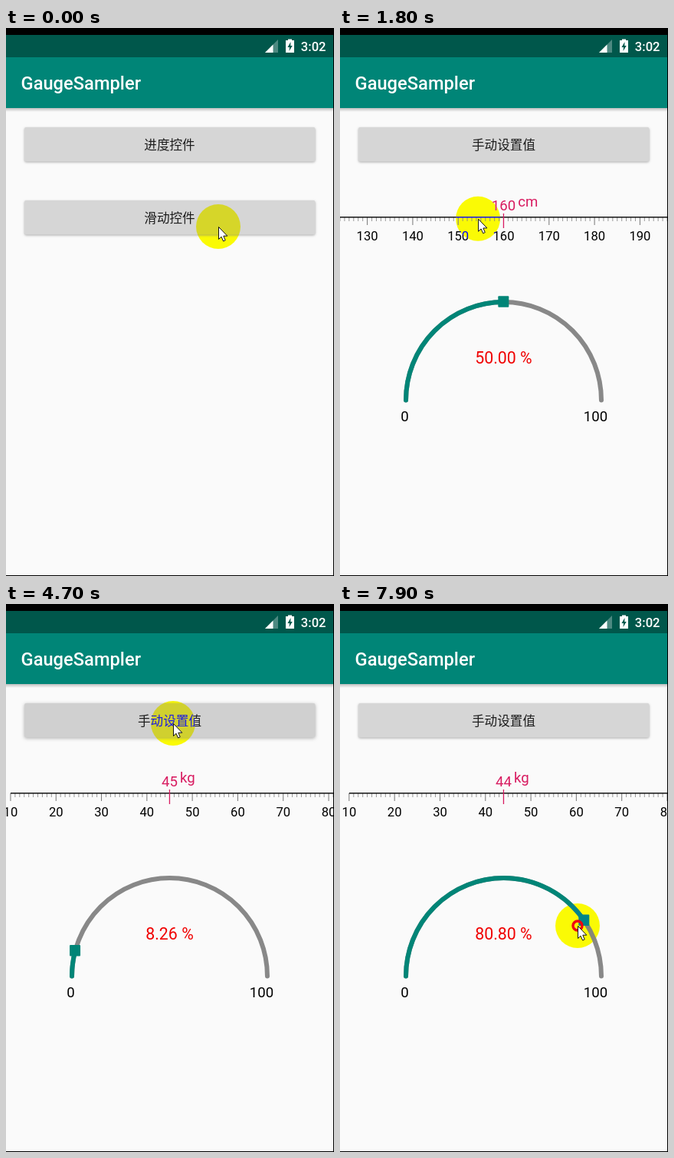
Recreate the animation shown at these times as an HTML page with a canvas. Size 428 by 712 pixels, loop 8 s.

```html
<!DOCTYPE html>
<html lang="zh">
<head>
<meta charset="utf-8">
<style>
html, body { margin: 0; width: 100%; height: 100%; overflow: hidden; background: #000; }
canvas { display: block; }
</style>
</head>
<body>
<canvas width="428" height="712"></canvas>
<script>
const ctx = document.querySelector('canvas').getContext('2d');
const LOOP = 8000, STEP = 100;
const MID = 213.5, UNIT = 5.93;
const ARC = { y: 483.5, r: 127.5 };
const TEAL = '#008577', PINK = '#d81b60';

// Rows are [time, values...]
const pointer = [
  [0, 277, 258], [500, 277, 258], [1100, 233, 217], [1900, 178, 249],
  [2500, 237, 249], [2800, 249, 251], [3400, 260, 317], [4200, 220, 158],
  [4700, 218, 155], [5600, 144, 260], [6500, 221, 260], [7000, 150, 260],
  [7400, 252, 361], [7900, 310, 418]
];
const height = [[1900, 160], [2500, 150], [2800, 148]];
const weight = [[5600, 45], [6500, 32], [7000, 44]];
const presses = [[300, 500], [1900, 2800], [4300, 4500], [5600, 7000], [7400, 8000]];

const clamp = v => Math.min(1, Math.max(0, v));
const ease = v => (1 - Math.cos(Math.PI * clamp(v))) / 2;
const between = (t, [a, b]) => t >= a && t < b;

function track(keys, t) {
  let i = 0;
  while (i < keys.length - 2 && t >= keys[i + 1][0]) i++;
  const [a, b] = [keys[i], keys[i + 1]];
  const k = ease((t - a[0]) / (b[0] - a[0]));
  return a.slice(1).map((v, n) => v + (b[n + 1] - v) * k);
}

function rect(x, y, w, h, color) {
  ctx.fillStyle = color;
  ctx.fillRect(x, y, w, h);
}

function text(str, x, y, size, color, align = 'center', weight = 400) {
  ctx.font = `${weight} ${size}px Roboto, "Noto Sans CJK SC", sans-serif`;
  ctx.textAlign = align;
  ctx.fillStyle = color;
  ctx.fillText(str, x, y);
}

function poly(points, color) {
  ctx.beginPath();
  points.forEach(p => ctx.lineTo(...p));
  ctx.closePath();
  ctx.fillStyle = color;
  ctx.fill();
}

function button(label, y, pressed) {
  ctx.save();
  ctx.shadowColor = 'rgba(0,0,0,.3)';
  ctx.shadowBlur = pressed ? 4 : 3;
  ctx.shadowOffsetY = 1;
  ctx.fillStyle = pressed ? '#d0d0d0' : '#d6d6d6';
  ctx.beginPath();
  ctx.roundRect(24, y, 379.5, 44.5, 2.4);
  ctx.fill();
  ctx.restore();
  text(label, MID, y + 28.5, 16.6, '#1c1c1c');
}

function base() {
  rect(0, 38, 427, 673, '#fafafa');
  const shade = ctx.createLinearGradient(0, 104, 0, 109);
  shade.addColorStop(0, 'rgba(0,0,0,.24)');
  shade.addColorStop(1, 'rgba(0,0,0,0)');
  rect(0, 104, 427, 5, shade);
  rect(0, 38, 427, 66, TEAL);
  text('GaugeSampler', 19.5, 80, 23.7, '#fff', 'left', 500);
}

function statusBar() {
  rect(0, 0, 428, 9, '#000');
  rect(0, 9, 427, 29, '#00574b');
  poly([[338, 32], [355, 15], [355, 32]], 'rgba(255,255,255,.3)');
  poly([[338, 32], [348.5, 21.5], [348.5, 32]], '#fff');
  rect(368, 14.5, 5, 3, '#fff');
  rect(365, 16, 11, 16, '#fff');
  poly([[371.5, 18], [367.5, 25], [370, 25], [369.5, 30], [373.7, 23], [371.3, 23]], '#00574b');
  text('3:02', 417.5, 30, 16.6, '#fff', 'right', 500);
}

function ruler(value, unit, min, max) {
  const at = v => MID + (v - value) * UNIT;
  const first = Math.max(min, Math.floor(value - 40));
  const last = Math.min(max, Math.ceil(value + 40));
  for (let v = first; v <= last; v++) {
    const major = v % 10 === 0;
    rect(at(v) - .5, 246, 1, major ? 10 : 5, major ? '#777' : '#999');
    if (major) text(v, at(v), 276, 16.6, '#000');
  }
  rect(at(first), 245, at(last) - at(first), 1.6, '#222');
  rect(MID - .7, 241, 1.3, 19, PINK);
  const label = String(Math.round(value));
  text(label, MID, 237, 18.6, PINK);
  text(unit, MID + ctx.measureText(label).width / 2 + 3, 232, 18.6, PINK, 'left');
}

function gauge(percent) {
  const angle = Math.PI * (1 + percent / 100);
  const stroke = (from, to, color) => {
    ctx.beginPath();
    ctx.arc(MID, ARC.y, ARC.r, from, to);
    ctx.strokeStyle = color;
    ctx.stroke();
  };
  ctx.lineWidth = 6;
  ctx.lineCap = 'round';
  stroke(Math.PI, 2 * Math.PI, '#888');
  stroke(Math.PI, angle, TEAL);
  const x = MID + ARC.r * Math.cos(angle), y = ARC.y + ARC.r * Math.sin(angle);
  ctx.fillStyle = TEAL;
  ctx.beginPath();
  ctx.roundRect(x - 7.2, y - 7.7, 14, 14.5, 1);
  ctx.fill();
  text(percent.toFixed(2) + ' %', MID, 436, 21.33, '#f00000');
  text('0', 84.5, 510.5, 18.6, '#000');
  text('100', 333.5, 510.5, 18.6, '#000');
}

function menuPage(t) {
  base();
  button('进度控件', 129, false);
  button('滑动控件', 224, between(t, [300, 600]));
}

function demoPage(t) {
  const second = t >= 4500;
  let percent = second ? 60 * ease((t - 4458) / 1000) : 50 * ease((t - 711) / 1000);
  if (t > 7400) percent += 20.8 * ease((t - 7400) / 500);
  base();
  button('手动设置值', 129, between(t, [4300, 4900]));
  if (second) ruler(track(weight, t)[0], 'kg', 10, 200);
  else ruler(track(height, t)[0], 'cm', 50, 250);
  gauge(percent);
}

function mouse(t) {
  const [x, y] = track(pointer, t);
  ctx.save();
  ctx.translate(x, y);
  // The highlight inverts the blue channel beneath it
  ctx.globalCompositeOperation = 'difference';
  ctx.fillStyle = '#00f';
  ctx.beginPath();
  ctx.arc(0, 0, 29, 0, 7);
  ctx.fill();
  ctx.globalCompositeOperation = 'source-over';
  if (presses.some(p => between(t, p))) {
    ctx.beginPath();
    ctx.arc(0, 0, 6, 0, 7);
    ctx.lineWidth = 3.4;
    ctx.strokeStyle = '#f00010';
    ctx.stroke();
  }
  poly([[.5, .5], [.5, 16.5], [4, 13.2], [6.6, 19], [9.2, 17.8], [6.8, 12.2], [11.8, 12.2]], '#fff');
  ctx.lineWidth = 1;
  ctx.strokeStyle = '#111';
  ctx.stroke();
  ctx.restore();
}

function draw(now) {
  const t = Math.floor(now % LOOP / STEP) * STEP;
  const open = clamp((t - 550) / 350);
  rect(0, 0, 428, 712, '#000');
  ctx.save();
  ctx.beginPath();
  ctx.rect(0, 0, 427, 711);
  ctx.clip();
  if (open < 1) menuPage(t);
  if (open > 0) {
    ctx.save();
    ctx.globalAlpha = open;
    ctx.translate(0, 54 * (1 - open) ** 2);
    demoPage(t);
    ctx.restore();
  }
  statusBar();
  mouse(t);
  ctx.restore();
  requestAnimationFrame(draw);
}
requestAnimationFrame(draw);
</script>
</body>
</html>
```
